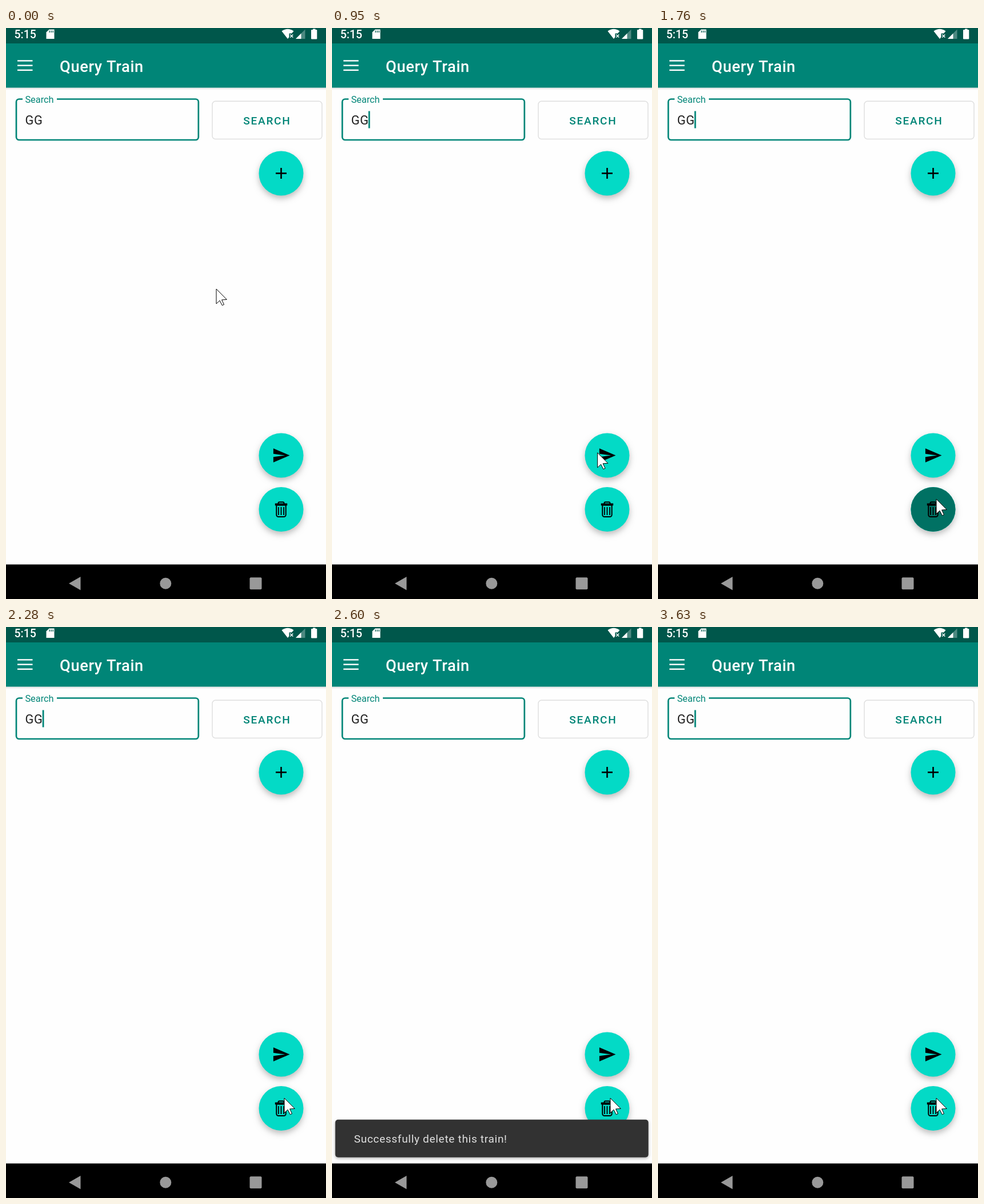
Animation, 560 px wide and 1000 px high, one loop 3.82 s. Source, as an HTML page with a canvas:

```html
<!DOCTYPE html>
<html lang="en">
<head>
<meta charset="utf-8">
<title>Query Train</title>
<style>
  html, body { margin: 0; width: 560px; height: 1000px; overflow: hidden; background: #fefefe; }
  canvas { display: block; }
</style>
</head>
<body>
<canvas id="stage" width="560" height="1000"></canvas>
<script>
const ctx = document.getElementById('stage').getContext('2d');
const LOOP = 3820;
const PRIMARY = '#008577', ACCENT = '#03dac6', PRESSED = '#007163';
const FAB_X = 481.5, FAB_R = 39;

// Times at which the text caret toggles, starting hidden
const BLINKS = [180, 500, 840, 1180, 1510, 1920, 2280, 2560, 2920, 3240, 3560];

// Pointer keys: time, x, y
const PATH = [
  [490, 368, 457], [600, 378, 502], [700, 390, 548], [800, 410, 610],
  [880, 436, 680], [950, 464, 743], [1010, 498, 792], [1090, 501, 805],
  [1170, 494, 817], [1250, 487, 825]
];

const clamp = v => Math.max(0, Math.min(1, v));
const progress = (t, from, length) => clamp((t - from) / length);

function rect(x, y, w, h, color) {
  ctx.fillStyle = color;
  ctx.fillRect(x, y, w, h);
}

function roundRect(x, y, w, h, r) {
  ctx.beginPath();
  ctx.roundRect(x, y, w, h, r);
}

function poly(points, color) {
  ctx.beginPath();
  points.forEach(([x, y]) => ctx.lineTo(x, y));
  ctx.closePath();
  ctx.fillStyle = color;
  ctx.fill();
}

function disc(x, y, r, color) {
  ctx.beginPath();
  ctx.arc(x, y, r, 0, Math.PI * 2);
  ctx.fillStyle = color;
  ctx.fill();
}

function text(str, x, y, size, color, weight = 400, spacing = 0) {
  ctx.font = `${weight} ${size}px Roboto, sans-serif`;
  ctx.letterSpacing = spacing + 'px';
  ctx.fillStyle = color;
  ctx.fillText(str, x, y);
}

function shadow(alpha, blur, dy) {
  ctx.shadowColor = `rgba(0,0,0,${alpha})`;
  ctx.shadowBlur = blur;
  ctx.shadowOffsetY = dy;
}

function statusBar() {
  rect(0, 0, 560, 27, '#00574b');
  text('5:15', 14.5, 18, 19.5, '#fff', 500);

  // memory card
  poly([[75.5, 2.5], [84.5, 2.5], [84.5, 19], [70.5, 19], [70.5, 7.5]], '#fff');
  [75.5, 78.5, 81.5].forEach(x => rect(x, 4.5, 1.3, 3.5, '#00574b'));

  // wifi with a small cross
  ctx.beginPath();
  ctx.moveTo(493, 19);
  ctx.lineTo(482.5, 5.5);
  ctx.quadraticCurveTo(493, -2, 503.5, 5.5);
  ctx.lineTo(500, 9.5);
  ctx.lineTo(495.5, 9.5);
  ctx.lineTo(495.5, 16);
  ctx.closePath();
  ctx.fillStyle = '#fff';
  ctx.fill();
  ctx.strokeStyle = '#fff';
  ctx.lineWidth = 1.5;
  ctx.beginPath();
  ctx.moveTo(497.3, 11.5); ctx.lineTo(502.3, 16.5);
  ctx.moveTo(502.3, 11.5); ctx.lineTo(497.3, 16.5);
  ctx.stroke();

  // signal
  poly([[507, 19], [523.5, 2.5], [523.5, 19]], '#4d8981');
  poly([[507, 19], [516.5, 9.5], [516.5, 19]], '#fff');

  // battery
  rect(537, 1.5, 4.5, 3, '#fff');
  roundRect(534, 3, 10.3, 16.5, 1.3);
  ctx.fill();
}

function appBar() {
  const fade = ctx.createLinearGradient(0, 104, 0, 109);
  fade.addColorStop(0, 'rgba(0,0,0,.12)');
  fade.addColorStop(1, 'rgba(0,0,0,0)');
  rect(0, 104, 560, 5, fade);
  rect(0, 27, 560, 77.5, PRIMARY);
  [56.2, 64.4, 72.6].forEach(y => rect(20, y, 26.5, 2.4, '#fff'));
  text('Query Train', 94, 76.5, 27.25, '#fff', 500, 0.6);
}

function form(caret) {
  ctx.strokeStyle = PRIMARY;
  ctx.lineWidth = 2.7;
  roundRect(18, 124.5, 318.8, 71.5, 5);
  ctx.stroke();
  rect(29, 121, 60, 8, '#fefefe');
  text('Search', 33.4, 130.8, 16.35, PRIMARY);
  text('GG', 33.4, 169, 21.8, '#202020', 400, 0.68);
  if (caret) rect(63.7, 145.5, 2.8, 30, PRIMARY);

  ctx.strokeStyle = '#dedede';
  ctx.lineWidth = 1.4;
  roundRect(361, 128.3, 192, 66.2, 5.5);
  ctx.stroke();
  text('SEARCH', 415.3, 169, 19.07, PRIMARY, 500, 1.7);
}

function fab(y) {
  ctx.save();
  shadow(0.26, 11, 5);
  disc(FAB_X, y, FAB_R, ACCENT);
  ctx.restore();
}

function ripple(t, y) {
  if (t < 1510 || t >= 1940) return;
  const grow = progress(t, 1500, 190);
  ctx.save();
  ctx.beginPath();
  ctx.arc(FAB_X, y, FAB_R, 0, Math.PI * 2);
  ctx.clip();
  ctx.globalAlpha = progress(t, 1490, 60) * (1 - progress(t, 1800, 140));
  const r = 12 + 30 * (1 - (1 - grow) ** 2);
  disc(FAB_X + 6 * (1 - grow), y - 12 * (1 - grow), r, PRESSED);
  ctx.restore();
}

function plusIcon(y) {
  rect(FAB_X - 9.5, y - 1.3, 19, 2.6, '#000');
  rect(FAB_X - 1.3, y - 9.5, 2.6, 19, '#000');
}

function sendIcon(y) {
  const s = 1.3625;
  const shape = [[2, 21], [23, 12], [2, 3], [2, 10], [17, 12], [2, 14]];
  poly(shape.map(([px, py]) => [FAB_X + (px - 12) * s, y + (py - 12) * s]), '#000');
}

function trashIcon(y) {
  ctx.save();
  ctx.translate(FAB_X, y);
  ctx.strokeStyle = '#000';
  ctx.lineWidth = 2;
  roundRect(-5, -12.7, 10, 5, 2);
  ctx.stroke();
  rect(-10.7, -10.5, 21.4, 3.8, '#000');
  roundRect(-8.2, -7.5, 16.4, 20.5, [0, 0, 3.5, 3.5]);
  ctx.stroke();
  [-4.6, 0, 4.6].forEach(x => rect(x - 0.9, -4, 1.8, 14, '#000'));
  ctx.restore();
}

function snackbar(t) {
  if (t < 2520 || t >= 3630) return;
  const enter = progress(t, 2495, 100);
  const scale = 0.8 + 0.2 * (1 - (1 - enter) ** 2.2);
  ctx.save();
  ctx.globalAlpha = enter * (1 - progress(t, 3545, 80));
  ctx.translate(279.7, 895.8);
  ctx.scale(scale, scale);
  ctx.save();
  shadow(0.3, 5, 2);
  roundRect(-274, -33, 548, 66, 5);
  ctx.fillStyle = '#323232';
  ctx.fill();
  ctx.restore();
  text('Successfully delete this train!', -241.2, 7.5, 19.07, '#e0e0e0', 400, 0.68);
  ctx.restore();
}

function navBar() {
  rect(0, 939.5, 560, 60.5, '#000');
  poly([[110, 972.7], [130.5, 961], [130.5, 984.5]], '#999');
  disc(279.3, 972.7, 10, '#999');
  roundRect(426.5, 962.3, 21, 21, 2);
  ctx.fillStyle = '#999';
  ctx.fill();
}

function pointerAt(t) {
  const next = PATH.findIndex(key => key[0] > t);
  if (next === 0) return PATH[0].slice(1);
  if (next < 0) return PATH[PATH.length - 1].slice(1);
  const a = PATH[next - 1], b = PATH[next];
  const k = progress(t, a[0], b[0] - a[0]);
  return [a[1] + (b[1] - a[1]) * k, a[2] + (b[2] - a[2]) * k];
}

function pointer(t) {
  const [x, y] = pointerAt(t);
  const shape = [[0, 0], [0, 26], [6, 20.3], [10.3, 28.8], [13.5, 27.3], [9.6, 19], [18.3, 18.5]];
  poly(shape.map(([px, py]) => [x + px, y + py]), '#fff');
  ctx.strokeStyle = '#000';
  ctx.lineWidth = 1;
  ctx.stroke();
}

function draw(t) {
  rect(0, 0, 560, 1000, '#fefefe');
  statusBar();
  appBar();
  form(BLINKS.filter(b => b <= t).length % 2 === 1);
  [254.5, 748.5, 843].forEach(fab);
  ripple(t, 843);
  plusIcon(254.5);
  sendIcon(748.5);
  trashIcon(843);
  snackbar(t);
  navBar();
  pointer(t);
}

const start = performance.now();
function tick() {
  draw((performance.now() - start) % LOOP);
  requestAnimationFrame(tick);
}
draw(0);
requestAnimationFrame(tick);
</script>
</body>
</html>
```
